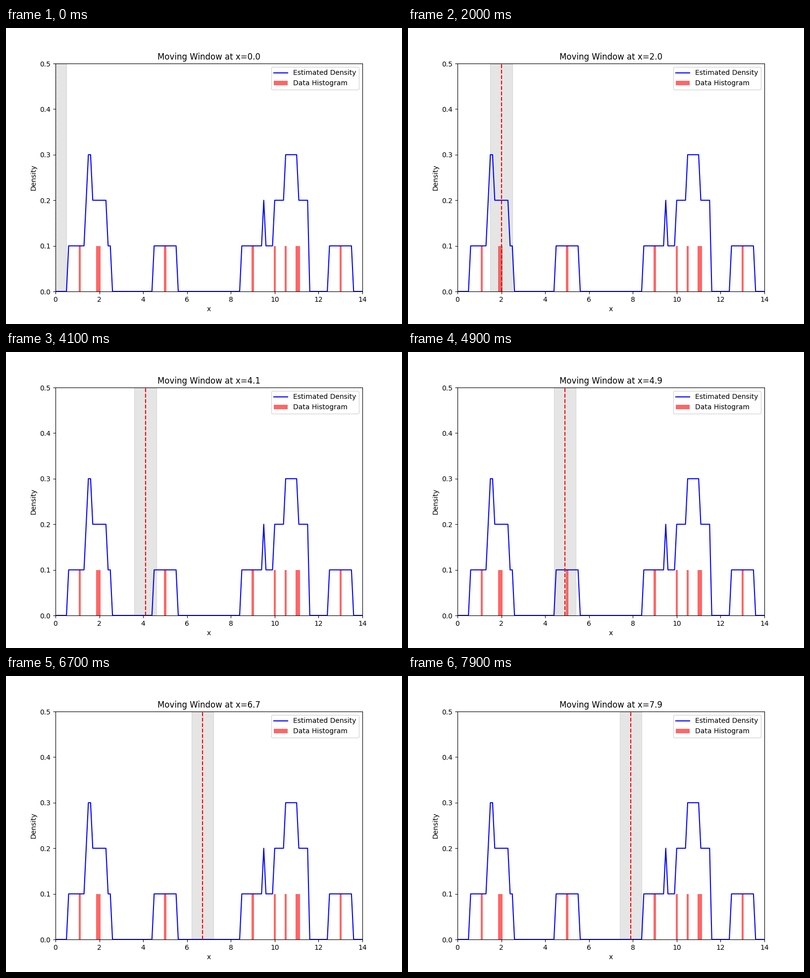
Recreate the animation shown at these times as a matplotlib script. Size 800 by 600 pixels, loop 8 s.

```python
import matplotlib.pyplot as plt
import numpy as np
from matplotlib.animation import FuncAnimation

DATA = np.array([1.1, 1.9, 2.0, 5.0, 9.0, 10.0, 10.5, 11.0, 11.1, 13.0])
HALF = 0.5
STEP = 0.1
FRAMES = 80

# Share of samples inside a window of width 1 centred on each x
xs = np.arange(141) * STEP
inside = (DATA >= xs[:, None] - HALF) & (DATA <= xs[:, None] + HALF)
density = inside.sum(axis=1) / len(DATA)

fig, ax = plt.subplots(figsize=(8, 6), dpi=100)
ax.bar(DATA, 1 / len(DATA), width=STEP, color="red", alpha=0.6,
       label="Data Histogram")
ax.plot(xs, density, color="blue", label="Estimated Density")
center = ax.axvline(0, color="red", linestyle="--")
window = ax.axvspan(-HALF, HALF, color="gray", alpha=0.2)

ax.set_xlim(0, 14)
ax.set_ylim(0, 0.5)
ax.set_xlabel("x")
ax.set_ylabel("Density")
ax.legend(loc="upper right")
title = ax.set_title("Moving Window at x=0.0")


def update(i):
    x = xs[i]
    center.set_xdata([x, x])
    window.set_x(x - HALF)
    title.set_text(f"Moving Window at x={x:.1f}")
    return center, window, title


anim = FuncAnimation(fig, update, frames=FRAMES, interval=100,
                     repeat=True, repeat_delay=0, blit=False)
plt.show()
```
